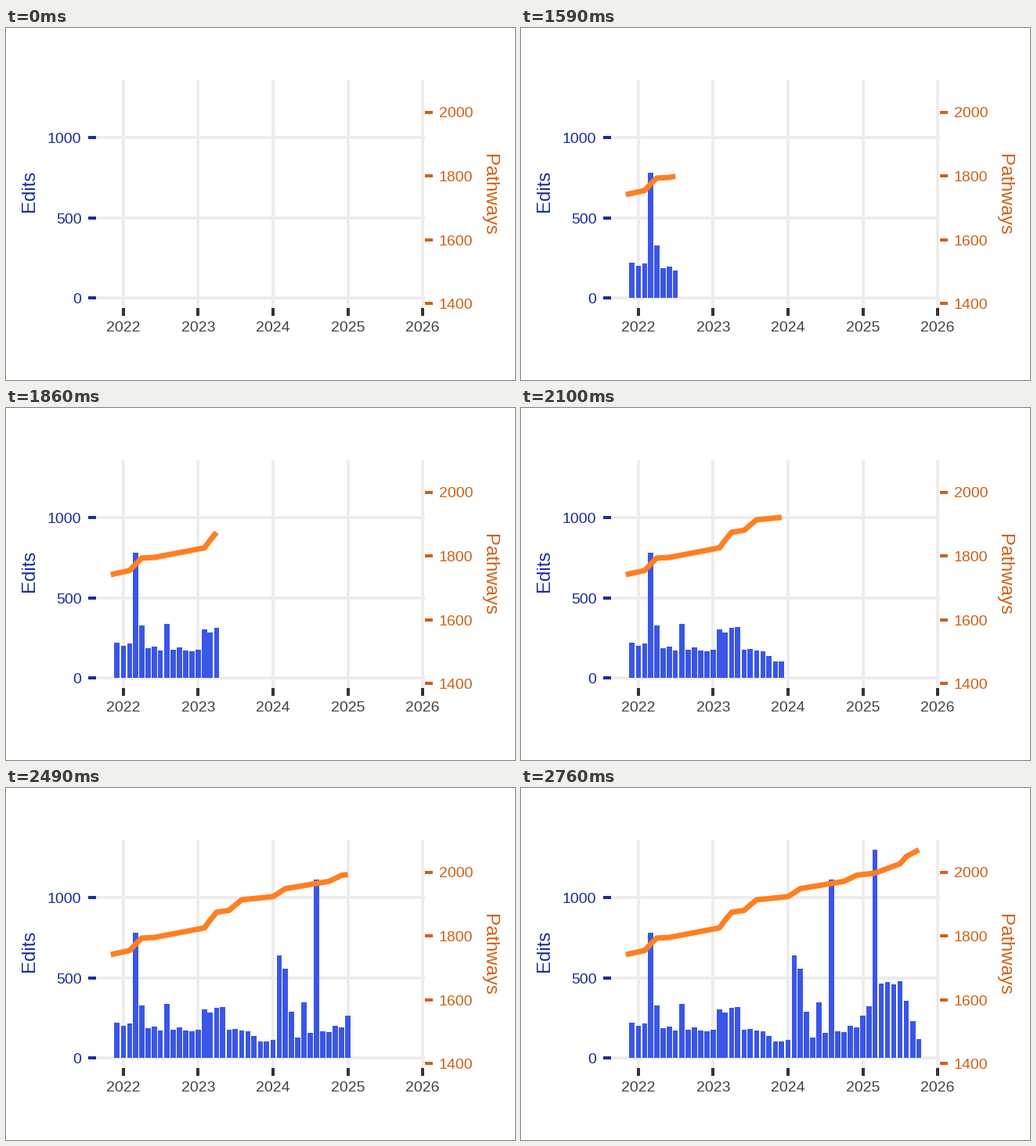
Write a matplotlib script that moves like this. It is 650 px wide and 450 px high and loops after 2.79 s.

```python
import numpy as np
import matplotlib.pyplot as plt
from matplotlib.animation import FuncAnimation
from matplotlib.patches import Rectangle

W, H, DPI = 650, 450, 100
STEP, FRAMES, HOLD = 30, 93, 46        # ms per step, steps per loop, empty steps

BAR, LINE = "#3a56e8", "#ff7f22"
BLUE, ORANGE = "#1a2d9a", "#cd6218"
GRID, TICK, YEAR_TEXT = "#ededed", "#333333", "#444444"

LEFT, RIGHT, TOP, BOTTOM = 115, 535, 66, 358
BAR_W = 6.6


def date_x(dates):
    days = (dates.astype("datetime64[D]") - np.datetime64("2022-01-01")).astype(int)
    return 149.8 + days * 0.2617


def edits_y(v):
    return 345.2 - np.asarray(v) * 0.2048


def pathways_y(v):
    return 107.5 + (2000 - np.asarray(v)) * 0.4075


def between(n, keys):
    """Straight runs through (month, value) key points."""
    return np.interp(np.arange(n), *zip(*keys))


def monthly_edits(n):
    """A drifting base level with a little noise and a few busy months."""
    level = between(n, [(0, 205), (13, 165), (14, 285), (17, 300), (18, 190),
                        (24, 105), (33, 165), (36, 190), (40, 455), (43, 480),
                        (46, 127)])
    level += np.random.default_rng(4).uniform(-20, 20, n)
    busy = {3: 782, 4: 328, 8: 337, 26: 640, 27: 557, 28: 288,
            30: 347, 32: 1114, 39: 1300}
    for month, value in busy.items():
        level[month] = value
    return level


def pathway_totals(n):
    """Slow growth broken by short steps up."""
    return between(n, [(0, 1741), (3, 1754), (5, 1793), (7, 1795), (15, 1825),
                       (17, 1874), (19, 1880), (21, 1913), (26, 1923),
                       (28, 1948), (35, 1971), (37, 1990), (40, 1997),
                       (44, 2026), (45, 2049), (47, 2070)])


def px(n):
    return n * 72 / DPI


plt.rcParams["font.family"] = "Liberation Sans"
fig = plt.figure(figsize=(W / DPI, H / DPI), dpi=DPI, facecolor="white")
ax = fig.add_axes([0, 0, 1, 1])
ax.set_xlim(0, W)
ax.set_ylim(H, 0)
ax.axis("off")


def stroke(x, y, color, width=4, z=1):
    return ax.plot(x, y, color=color, lw=px(width), solid_capstyle="butt",
                   solid_joinstyle="round", zorder=z)[0]


def label(x, y, text, color, size=19.5, ha="center", rotation=0):
    ax.text(x, y, text, color=color, fontsize=px(size), ha=ha, va="baseline",
            rotation=rotation, rotation_mode="anchor")


# Grid, ticks and labels
for v in (0, 500, 1000):
    y = edits_y(v)
    stroke([LEFT, RIGHT], [y, y], GRID)
    stroke([LEFT - 10, LEFT], [y, y], BLUE)
    label(96.5, y + 7, str(v), BLUE, ha="right")

years = np.arange("2022", "2027", dtype="datetime64[Y]")
for year, x in zip(years, date_x(years)):
    stroke([x, x], [TOP, BOTTOM], GRID)
    stroke([x, x], [BOTTOM, BOTTOM + 10], TICK)
    label(x, 388.5, str(year), YEAR_TEXT)

for v in range(1400, 2001, 200):
    y = pathways_y(v)
    stroke([RIGHT, RIGHT + 10], [y, y], ORANGE)
    label(552.5, y + 7, str(v), ORANGE, ha="left")

label(36, 208.5, "Edits", BLUE, 24, rotation=90)
label(610.5, 212.5, "Pathways", ORANGE, 24, rotation=270)

# Data
month_x = date_x(np.arange("2021-11", "2025-11", dtype="datetime64[M]"))
line_y = pathways_y(pathway_totals(len(month_x)))
base = edits_y(0)
bars = [
    ax.add_patch(Rectangle((x - BAR_W / 2, base), BAR_W, edits_y(v) - base,
                           fc=BAR, ec="none", zorder=2))
    for x, v in zip(month_x[1:], monthly_edits(len(month_x) - 1))
]
trend = stroke([], [], LINE, 7, z=3)


def draw(i):
    shown = max(0, i - HOLD + 1)
    for k, bar in enumerate(bars):
        bar.set_visible(k < shown)
    points = shown + 1 if shown else 0
    trend.set_data(month_x[:points], line_y[:points])
    return [*bars, trend]


anim = FuncAnimation(fig, draw, frames=FRAMES, interval=STEP, repeat=True,
                     repeat_delay=0, blit=False)
plt.show()
```
